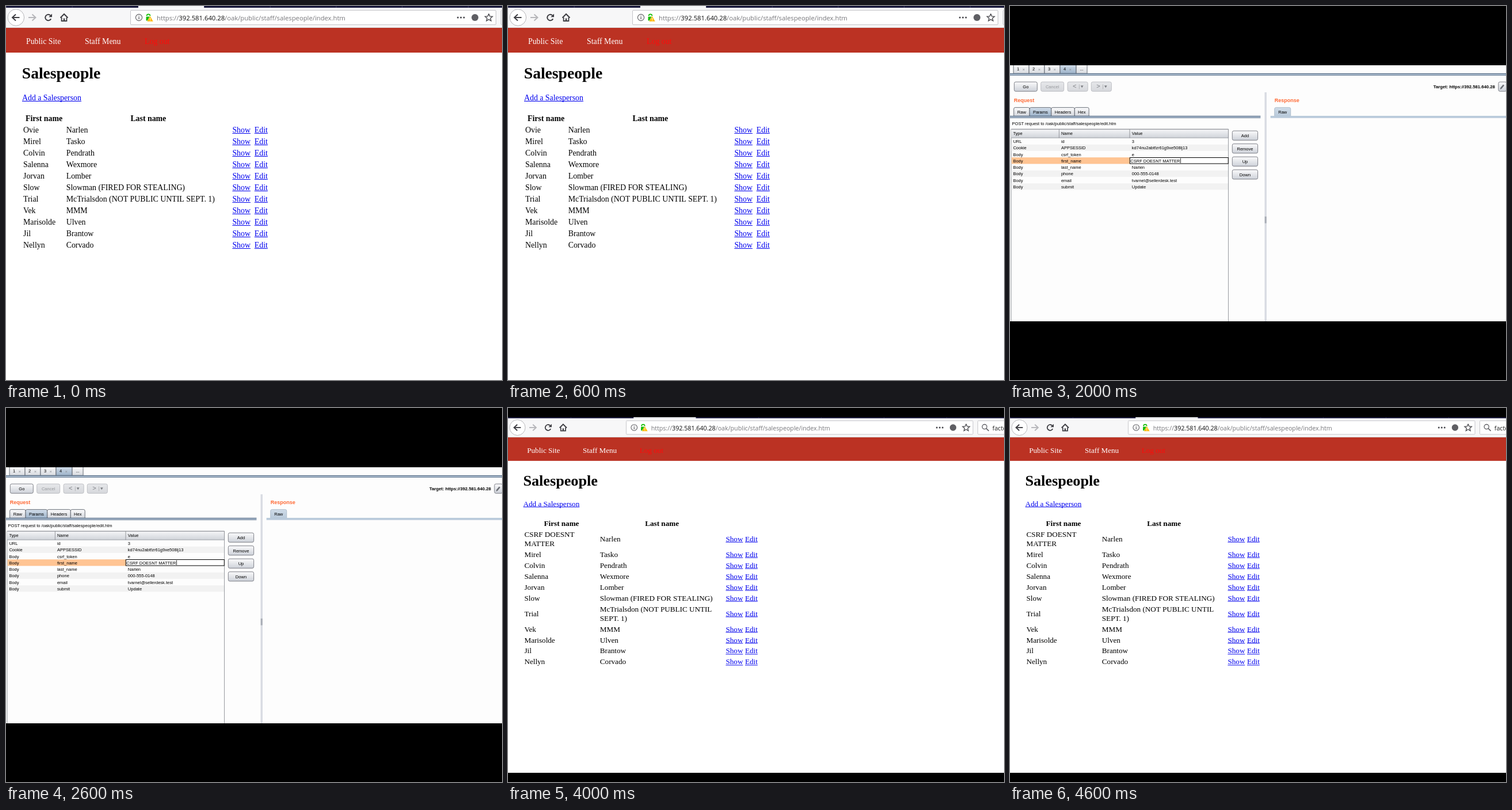
These frames come from a looping animation (862 px wide and 650 px high, 5000 ms). An HTML page with a canvas:

```html
<!DOCTYPE html>
<html lang="en">
<head>
<meta charset="utf-8">
<title>Form token check</title>
<style>
html, body { margin: 0; width: 100%; height: 100%; overflow: hidden; background: #000; }
canvas { display: block; }
</style>
</head>
<body>
<canvas id="stage" width="862" height="650"></canvas>
<script>
const ctx = document.getElementById('stage').getContext('2d');
const SANS = '"Liberation Sans", Arial, sans-serif';
const SERIF = '"Liberation Serif", "Times New Roman", serif';
const MONO = '"Liberation Mono", "Courier New", monospace';
const UI = '"Open Sans", sans-serif';
const HOST = '392.581.640.28';
const DIR = '/oak/public/staff/salespeople/';
const SLIDE = 1000;

// ---- helpers ----
function rect(x, y, w, h, fill) {
  ctx.fillStyle = fill;
  ctx.fillRect(x, y, w, h);
}

function text(str, x, y, font, fill = '#000', align = 'left') {
  ctx.font = font;
  ctx.fillStyle = fill;
  ctx.textAlign = align;
  ctx.fillText(str, x, y);
}

function box(x, y, w, h, r, fill, stroke, lw = 1) {
  ctx.beginPath();
  ctx.roundRect(x, y, w, h, r);
  if (fill) { ctx.fillStyle = fill; ctx.fill(); }
  if (stroke) { ctx.strokeStyle = stroke; ctx.lineWidth = lw; ctx.stroke(); }
}

function disc(x, y, r, fill, stroke, lw = 1) {
  box(x - r, y - r, 2 * r, 2 * r, r, fill, stroke, lw);
}

function poly(pts, fill, stroke, lw = 1) {
  ctx.beginPath();
  pts.forEach(([x, y]) => ctx.lineTo(x, y));
  if (fill) { ctx.closePath(); ctx.fillStyle = fill; ctx.fill(); }
  if (stroke) { ctx.strokeStyle = stroke; ctx.lineWidth = lw; ctx.stroke(); }
}

function fade(y, h, ...stops) {
  const g = ctx.createLinearGradient(0, y, 0, y + h);
  stops.forEach((c, i) => g.addColorStop(i / (stops.length - 1), c));
  return g;
}

// Draws in a scaled coordinate system, clipped to a band of the stage.
function view(top, bottom, scale, dx, dy, draw) {
  ctx.save();
  ctx.beginPath();
  ctx.rect(0, top, 862, bottom - top);
  ctx.clip();
  ctx.translate(dx, dy);
  ctx.scale(scale, scale);
  draw();
  ctx.restore();
}

// ---- browser page ----
const PEOPLE = [
  ['Ovie', 'Narlen'], ['Mirel', 'Tasko'], ['Colvin', 'Pendrath'],
  ['Salenna', 'Wexmore'], ['Jorvan', 'Lomber'],
  ['Slow', 'Slowman (FIRED FOR STEALING)'],
  ['Trial', 'McTrialsdon (NOT PUBLIC UNTIL SEPT. 1)'],
  ['Vek', 'MMM'], ['Marisolde', 'Ulven'], ['Jil', 'Brantow'], ['Nellyn', 'Corvado']
];
const EDITED = PEOPLE.map(p => p.slice());
EDITED[0][0] = 'CSRF DOESNT\nMATTER';
EDITED[6][1] = 'McTrialsdon (NOT PUBLIC UNTIL\nSEPT. 1)';

const BODY = '13.84px ' + SERIF;
const BOLD = 'bold 13.84px ' + SERIF;

function link(str, x, y) {
  text(str, x, y, BODY, '#0000ee');
  rect(x, y + 1, ctx.measureText(str).width, 1, '#0000ee');
}

function arrow(x, y, dir, color) {
  poly([[x - 6.5 * dir, y], [x + 6 * dir, y]], null, color, 2);
  poly([[x, y - 5.5], [x + 6 * dir, y], [x, y + 5.5]], null, color, 2);
}

function star(x, y, r) {
  const pts = [];
  for (let i = 0; i <= 10; i++) {
    const a = -Math.PI / 2 + i * Math.PI / 5, d = i % 2 ? r * 0.45 : r;
    pts.push([x + d * Math.cos(a), y + d * Math.sin(a)]);
  }
  poly(pts, null, '#4a4a4f', 1.4);
}

function toolbar() {
  const ink = '#3e3e43';
  rect(0, 0, 920, 38, '#f7f7f8');
  rect(0, 0, 920, 3, '#17173a');
  for (let x = 0; x < 920; x += 114.7) rect(x, 0, 0.8, 3, '#44446a');
  rect(230, 0, 114, 3, '#f5f6f7');
  rect(0, 37, 920, 1, '#d8d8da');

  disc(17.3, 20, 14.3, '#fff', '#b4b4b8');
  arrow(17, 20, -1, ink);
  arrow(45.5, 20, 1, '#b6b6ba');
  ctx.beginPath();
  ctx.arc(73.5, 20, 5.2, 0.45, 5.5);
  ctx.strokeStyle = ink;
  ctx.lineWidth = 2;
  ctx.stroke();
  poly([[80, 13.5], [80, 19.3], [74.2, 19.3]], ink);
  poly([[94.5, 20.5], [101, 14], [107.5, 20.5]], null, ink, 2);
  poly([[96.6, 20], [96.6, 26], [105.4, 26], [105.4, 20]], null, ink, 1.8);
  rect(99.8, 21.5, 2.4, 4.5, ink);

  box(216.5, 7.5, 635, 25, 1.5, '#fff', '#c4c4c8');
  disc(231, 20, 5.6, null, '#5a5a5f', 1.1);
  rect(230.4, 19, 1.3, 4, '#5a5a5f');
  rect(230.4, 16.7, 1.3, 1.3, '#5a5a5f');
  ctx.beginPath();
  ctx.arc(247.5, 17.3, 3, Math.PI, 0);
  ctx.strokeStyle = '#12bc00';
  ctx.lineWidth = 1.7;
  ctx.stroke();
  box(243.5, 18.5, 8, 7, 1, '#12bc00');
  poly([[250.5, 17.3], [256, 27], [245, 27]], '#ffb900', '#fff', 0.5);
  rect(250, 20.8, 1.1, 3, '#fff');
  rect(250, 24.6, 1.1, 1.1, '#fff');

  let x = 262;
  [['https://', '#77777b'], [HOST, '#0c0c0d'], [DIR + 'index.htm', '#77777b']].forEach(([s, c]) => {
    text(s, x, 25, '11.25px ' + UI, c);
    x += ctx.measureText(s).width;
  });

  [785.3, 790.6, 795.9].forEach(d => disc(d, 20, 1.6, '#4a4a4f'));
  disc(815, 20, 6, '#5f5f64');
  star(839, 20.3, 6.8);

  box(860.3, 7.5, 80, 25, 1.5, '#fff', '#c4c4c8');
  disc(872.7, 18.5, 4.3, null, '#5f5f64', 1.4);
  poly([[875.8, 21.6], [880.5, 26.3]], null, '#5f5f64', 1.8);
  text('factory', 887, 25, '11.25px ' + UI, '#222');
}

function cell(str, x, mid) {
  const lines = str.split('\n');
  lines.forEach((s, i) => text(s, x, mid + 5 + (i - (lines.length - 1) / 2) * 16.8, BODY));
}

function page(people, cols) {
  rect(0, 0, 920, 660, '#fff');
  toolbar();
  rect(0, 38, 920, 43, '#bb3223');
  text('Public Site', 35, 66, BODY, '#fff');
  text('Staff Menu', 137, 66, BODY, '#fff');
  text('Log out', 241, 66, BODY, '#ff0a0a');
  text('Salespeople', 27.8, 126, 'bold 27.6px ' + SERIF);
  link('Add a Salesperson', 28, 164);
  text('First name', cols.firstHead, 200, BOLD, '#000', 'center');
  text('Last name', cols.lastHead, 200, BOLD, '#000', 'center');
  let top = 205;
  for (const [first, last] of people) {
    const h = (first + last).includes('\n') ? 36.8 : 20;
    const mid = top + h / 2;
    cell(first, 30, mid);
    cell(last, cols.last, mid);
    link('Show', cols.show, mid + 5);
    link('Edit', cols.edit, mid + 5);
    top += h;
  }
}

// ---- request tool ----
const LABEL = '7.4px ' + SANS;
const STRONG = 'bold 7.6px ' + SANS;
const HEADING = 'bold 8.9px ' + SANS;

const REPLY = [
  'HTTP/1.1 302 Found',
  'Date: Tue, 03 Apr 2018 23:46:09 GMT',
  'Server: Quorle/2.4.18 (Velmix)',
  'Strict-Transport-Security: max-age=63072000; includeSubdomains',
  'X-Frame-Options: DENY',
  'X-Content-Type-Options: nosniff',
  'Expires: Thu, 19 Nov 1981 08:52:00 GMT',
  'Cache-Control: no-store, no-cache, must-revalidate',
  'Pragma: no-cache',
  'X-XSS-Protection: 0',
  'Location: show.htm?id=3',
  'Content-Length: 0',
  'Connection: close',
  'Content-Type: text/html; charset=UTF-8'
];

function button(str, x, y, w, off) {
  const fill = off ? fade(y, 16, '#e6e7ea', '#d6d8dc') : fade(y, 16, '#fafafb', '#e4e6ea', '#cdd1d9');
  box(x, y, w, 16, 2.5, fill, off ? '#b9bbc0' : '#74777e', 0.9);
  if (str) text(str, x + w / 2, y + 11, LABEL, off ? '#96989c' : '#000', 'center');
}

function stepButton(sign, x) {
  button('', x, 155.3, 34.5, true);
  text(sign, x + 12, 166.6, '11px ' + SANS, '#7c7e83', 'center');
  rect(x + 19.5, 159.5, 0.7, 8, '#a5a7ab');
  poly([[x + 22.3, 161.5], [x + 27, 161.5], [x + 24.6, 165.5]], '#7c7e83');
}

function tab(str, x, y, w, h, mode) {
  const fill = mode === 'on' ? fade(y, h, '#d3deea', '#9db3ca')
    : mode === 'dim' ? fade(y, h, '#d0dce8', '#b9cadb')
    : fade(y, h, '#fbfbfc', '#d4d7dd');
  box(x, y, w, h, [2.5, 2.5, 0, 0], fill, mode === 'dim' ? '#a9b9c9' : '#5c626c', 0.9);
  text(str, x + w / 2, y + h / 2 + 2.8, LABEL, '#000', 'center');
}

function rule(x, y, w, active) {
  rect(x, y, w, 3.7, active ? '#c2d2e2' : '#b9cadb');
  if (active) {
    rect(x, y, w, 1.1, '#4a617b');
    rect(x, y + 2.6, w, 1.1, '#566c85');
  }
}

function sessionTabs() {
  const edges = [1.4, 28, 54.5, 81.1, 108.7, 127.4];
  ['1', '2', '3', '4', '...'].forEach((s, i) => {
    const x = edges[i], w = edges[i + 1] - x, on = i === 3;
    box(x, 125, w, 15.8, 0, on ? fade(125, 16, '#d3deea', '#9db3ca') : fade(125, 16, '#fafafb', '#d8dbe0'), '#5c626c', 0.9);
    if (i < 4) text('×', x + 17.5, 136.2, LABEL, '#8b8e94', 'center');
    text(s, x + (i < 4 ? 8 : w / 2), 136, LABEL, '#000', 'center');
  });
  rule(-6, 140.5, 900, true);
}

function table({ token, first, editing }) {
  const left = -2.5, right = 369, top = 236, rowH = 11.07;
  const rows = [
    ['URL', 'id', '3'],
    ['Cookie', 'APPSESSID', 'kd74nu2abtfzr61g9xe508lj13'],
    ['Body', 'csrf_token', token],
    ['Body', 'first_name', first],
    ['Body', 'last_name', 'Narlen'],
    ['Body', 'phone', '000-555-0148'],
    ['Body', 'email', 'tvarnel@sellerdesk.test'],
    ['Body', 'submit', 'Update']
  ];
  const xs = [0.8, 83, 204];
  box(left, top, right - left, 355.4, 0, '#fdfdfd', '#8f9298', 0.9);
  rect(left, top, right - left, 15, fade(top, 15, '#f6f6f8', '#e3e5e9', '#d0d3d9'));
  rect(left, top, right - left, 0.8, '#8f9298');
  rect(left, top + 14.5, right - left, 0.8, '#8f9298');
  [79, 199.8, right - 0.5].forEach(x => rect(x, top, 0.8, 15, '#83868c'));
  ['Type', 'Name', 'Value'].forEach((s, i) => text(s, xs[i], 246.2, LABEL));
  rows.forEach((row, i) => {
    const y = 251.2 + i * rowH;
    if (i % 2) rect(left + 0.5, y, right - left - 1, rowH, '#f2f2f2');
    const active = editing && i === 3;
    if (active) {
      rect(left + 0.5, y, 202.5, rowH, '#ffc493');
      box(200.5, y + 0.3, 168.3, rowH - 0.6, 0, '#fff', '#000', 1);
    }
    row.forEach((s, c) => text(s, xs[c] - (active && c === 2 ? 2.5 : 0), y + 8.5, LABEL));
    if (active) rect(202 + ctx.measureText(first).width, y + 1.5, 0.8, rowH - 3, '#000');
  });
}

function pencilButton() {
  button('', 831, 155.3, 13.8);
  poly([[835, 166.5], [840, 160.5]], null, '#6b6e74', 2.6);
  poly([[833.6, 168.2], [834.4, 165.6], [836.2, 167.2]], '#6b6e74');
}

function tool(state) {
  rect(-10, 100, 920, 560, '#fdfdfd');
  sessionTabs();
  button('Go', 2.7, 155.3, 39.3);
  button('Cancel', 48.3, 155.3, 39.3, true);
  stepButton('<', 94);
  stepButton('>', 134.5);
  if (state.reply) button('Follow redirection', 179.5, 155.3, 75.5);
  text('Target: https://' + HOST, 825, 166.3, STRONG, '#000', 'right');
  pencilButton();
  button('', 849, 155.3, 13.8);
  text('?', 856, 167, 'bold 10px ' + SANS, '#6b6e74', 'center');

  text('Request', 2, 190, HEADING, '#ff6a35');
  text('Response', 448, 190, HEADING, '#ff6a35');
  tab('Raw', 2, 199, 27, 14.8);
  tab('Headers', 66, 199, 40, 14.8);
  tab('Hex', 106, 199, 24.5, 14.8);
  tab('Params', 29, 199, 37, 14.8, 'on');
  rule(-6, 213.3, 430, true);
  if (state.reply) {
    tab('Headers', 475.5, 199, 40, 14.8);
    tab('Hex', 515.5, 199, 25, 14.8);
  }
  tab('Raw', 448, 199, 27.5, 14.8, state.reply ? 'on' : 'dim');
  rule(441, 213.3, 440, state.reply);

  text('POST request to ' + DIR + 'edit.htm', -1, 228.8, LABEL);
  table(state);
  ['Add', 'Remove', 'Up', 'Down'].forEach((s, i) => button(s, 375.7, 239 + i * 22.2, 43.6));

  rect(431, 173, 3.4, 500, '#d9dce3');
  rect(431.2, 385.5, 3, 11.5, '#a9adb6');

  if (state.reply) {
    REPLY.forEach((s, i) => text(s, 442.8, 225.3 + i * 11.04, '8.05px ' + MONO));
    [444.5, 470.2, 496, 521.2].forEach(x => button('', x, 592, 20.8));
    box(548, 592, 272.5, 16, 0, '#fff', '#74777e', 1);
  } else {
    rect(856.3, 217, 1.6, 400, '#6d7076');
    rect(857.9, 217, 14, 400, '#d8dade');
    rect(857.9, 218, 14, 12, '#eceef1');
    rect(857.9, 230, 14, 1.5, '#55585e');
    poly([[859.5, 226], [864, 226], [861.7, 220]], '#222');
  }
}

// ---- timeline ----
const SCENES = [
  () => view(0, 650, 1, 0, 0, () =>
    page(PEOPLE, { firstHead: 66, lastHead: 247.3, last: 104.7, show: 393.4, edit: 431.8 })),
  () => view(144, 507, 1, 0, 0, () =>
    tool({ token: '5e1f70429ab6cd83170b2efa94d8c306', first: 'Ovi' })),
  () => view(103, 548, 1.016, 4.6, -25.8, () =>
    tool({ token: 'e', first: 'CSRF DOESNT MATTER', editing: true })),
  () => view(98, 552, 1.0042, 2.9, -46.7, () =>
    tool({ token: 'e', first: 'CSRF DOESNT MATTER', reply: true })),
  () => view(16, 634, 0.949, 0, 15, () =>
    page(EDITED, { firstHead: 98, lastHead: 282, last: 168.4, show: 398.8, edit: 434.1 }))
];

function draw() {
  const t = performance.now() % (SLIDE * SCENES.length);
  rect(0, 0, 862, 650, '#000');
  SCENES[Math.floor(t / SLIDE)]();
  requestAnimationFrame(draw);
}
draw();
</script>
</body>
</html>
```
